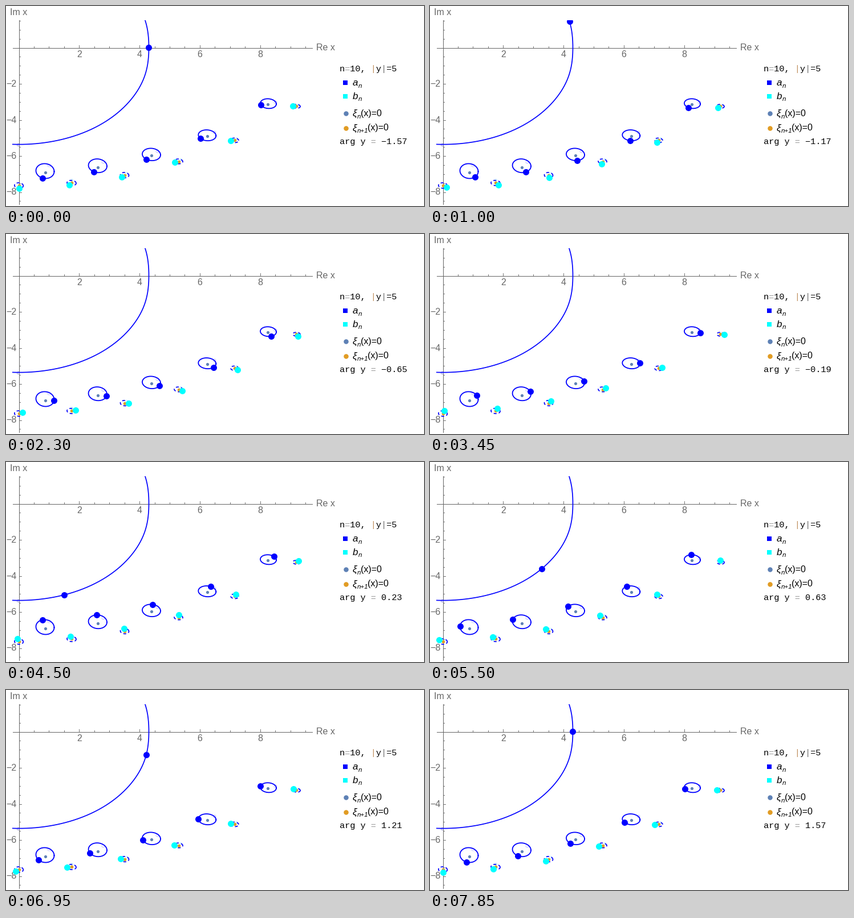
Animation of 733x352 px, one loop 7900 ms. Source, as a matplotlib script:

```python
import numpy as np
import matplotlib.pyplot as plt
from matplotlib.animation import FuncAnimation
from matplotlib.patches import Rectangle

W, H, DPI = 733, 352, 100
FRAMES, INTERVAL = 158, 50
OX, OY, SX, SY = 22.5, 73, 52.9, 31.75   # origin and pixels per unit
PX = 72 / DPI
GRAY = "#666666"
BLUE, CYAN, STEEL, ORANGE = "#0000ff", "#00ffff", "#5e81b5", "#e19c24"

# cx, cy, rx, ry, start angle, warp 1, warp 2, warp phase (degrees)
A_LOOPS = [
    (68.5, 290.5, 16, 13, 260, 16, 15, 205),
    (160.8, 281.2, 16.2, 12, 249, 15, 13, 205),
    (255, 261.3, 16, 10.8, 235, 12.5, 6, 205),
    (352.8, 227.6, 15.5, 9.5, 218, 9, 2, 205),
    (460, 171.8, 14, 8.5, 198, 10.5, 0, 195),
]
B_LOOPS = [
    (22.6, 316, 7.7, 4.8, 270, 15, 0, 0),
    (115, 311.5, 8, 4.6, 255, 22, 0, 30),
    (208, 297.7, 7.5, 4.7, 240, 18, 0, 60),
    (302.5, 273.5, 7.5, 4.2, 227, 14, 0, 95),
    (401, 236.4, 7, 4, 214, 15, 0, 100),
    (509.5, 176.5, 6.5, 3.4, 193, 18, 0, 120),
]
A_ZEROS = [(68.5, 292.5), (160.5, 283.5), (254.5, 262.5), (352.5, 228.5), (458.5, 172.5)]
B_ZEROS = [(22.5, 315.5), (114.7, 311), (207.5, 297.5), (302.5, 273.5), (400.5, 236.3), (509, 176)]


def ellipse(loop, theta):
    cx, cy, rx, ry = loop[:4]
    dx = rx * np.cos(theta)
    return cx + dx, cy - ry * np.sin(theta) + 0.05 * dx


def orbit(loop, psi):
    start, w1, w2, phase = np.radians(loop[4:])
    s = psi - phase
    return ellipse(loop, start + psi + w1 * np.sin(s) + w2 * np.sin(2 * s))


def branch(phi):
    """Large curve: odd series in exp(i phi), in pixels."""
    x = sum(c * np.exp(1j * k * phi)
            for k, c in zip((1, 3, 5, 7), (4.772, 0.512, 0.07, 0.02))) * -1j
    return OX + SX * x.real, OY - SY * x.imag


fig = plt.figure(figsize=(W / DPI, H / DPI), dpi=DPI, facecolor="white")
ax = fig.add_axes([0, 0, 1, 1])
ax.set(xlim=(0, W), ylim=(H, 0))
ax.axis("off")
plot_box = Rectangle((11, 25), 526, 324, transform=ax.transData)


def text(x, y, s, size=16, color="black", font="Liberation Sans", **kw):
    return ax.text(x, y, s, fontsize=size * PX, color=color, family=font,
                   va="baseline", **kw)


def mono(y, s, color="black"):
    return text(585, y, s, 15.3, color, "Liberation Mono")


def line(x, y, color=GRAY, width=1.0, **kw):
    return ax.plot(x, y, color=color, lw=width * PX, **kw)[0]


def dots(points, color, size, marker="o", **kw):
    x, y = zip(*points)
    return ax.plot(x, y, marker, color=color, ms=size * PX, mew=0, **kw)[0]


# axes
line((11.5, 537), (73.5, 73.5))
line((22.5, 22.5), (25, 349))
for i in range(1, 20):
    x = OX + SX * i / 2
    line((x, x), (73.5, 69 if i % 4 == 0 else 71), width=0.9)
for i in range(-17, 4):
    y = OY + 0.5 - SY * i / 2
    line((22.5, 27 if i % 4 == 0 else 25), (y, y), width=0.9)
for v in (2, 4, 6, 8):
    text(OX + SX * v, 90, str(v), color=GRAY, ha="center")
    text(18.5, OY + SY * v + 5.5, f"\u2212{v}", color=GRAY, ha="right")
text(7, 16, "Im x", color=GRAY)
text(544, 78.5, "Re x", color=GRAY)

# pale poles
for x, y in [(75, 279.5), (170, 274), (265, 255), (365, 222), (471.5, 168.5)]:
    ax.plot(x, y, "o", mfc="none", mec="#c4c4ff", mew=0.7, ms=5 * PX)
for x, y in [(114.5, 306), (211, 293.5), (305.5, 270), (404, 233), (511.5, 174)]:
    ax.plot(x, y, "o", mfc="none", mec="#c0f4ff", mew=0.7, ms=4 * PX)
ax.plot(20.5, 243.5, "o", mfc="none", mec="#9090d8", mew=0.6, ms=4 * PX)

# level curves
t = np.linspace(0, 2 * np.pi, 120)
line(*branch(np.linspace(-0.1, 2.1, 300)), BLUE, 1.7).set_clip_path(plot_box)
for loop in A_LOOPS:
    line(*ellipse(loop, t), BLUE, 1.8)
for loop in B_LOOPS:
    line(*ellipse(loop, t), BLUE, 1.7, dashes=(3, 2.3), dash_capstyle="butt")
dots(A_ZEROS, STEEL, 5.2, zorder=3)
dots(B_ZEROS, ORANGE, 5.6, zorder=3)

# legend
mono(115.5, "n 10,  y =5")
mono(115.5, " =", "#999999")
mono(115.5, "      |", "#c09060")
mono(115.5, "        |", "#707070")
dots([(595, 135)], BLUE, 8.5, "s")
dots([(595, 158.5)], CYAN, 8.5, "s")
dots([(595.5, 188.5)], STEEL, 8.5)
dots([(595.5, 214.5)], ORANGE, 8.5)
for y, s in ((140, "a"), (163.5, "b")):
    text(608, y, s, 17, style="italic")
    text(617.5, y + 3.5, "n", 11.5, style="italic")
for y, sub, end in ((194, "n", 622), (219.5, "n+1", 634)):
    text(608, y, "\u03be", 17, style="italic")
    text(615.5, y + 3.5, sub, 11.5, style="italic")
    text(end, y, "(x)=0")
mono(243.5, "      =", "#999999")
arg_text = mono(243.5, "")

a_dots = dots(A_ZEROS, BLUE, 11, zorder=5)
b_dots = dots(B_ZEROS, CYAN, 11, zorder=5)
big_dots = dots([(0, 0)], BLUE, 11, zorder=5)
big_dots.set_clip_path(plot_box)


def update(i):
    psi = 2 * np.pi * i / (FRAMES - 1)
    arg = (psi - np.pi) / 2
    a_dots.set_data(*zip(*(orbit(p, psi) for p in A_LOOPS)))
    b_dots.set_data(*zip(*(orbit(p, psi) for p in B_LOOPS)))
    big_dots.set_data(*branch(np.array([arg, arg + np.pi])))
    arg_text.set_text(f"arg y   {arg:.2f}".replace("-", "\u2212"))
    return a_dots, b_dots, big_dots, arg_text


anim = FuncAnimation(fig, update, frames=FRAMES, interval=INTERVAL,
                     repeat=True, repeat_delay=0, blit=False)
plt.show()
```
